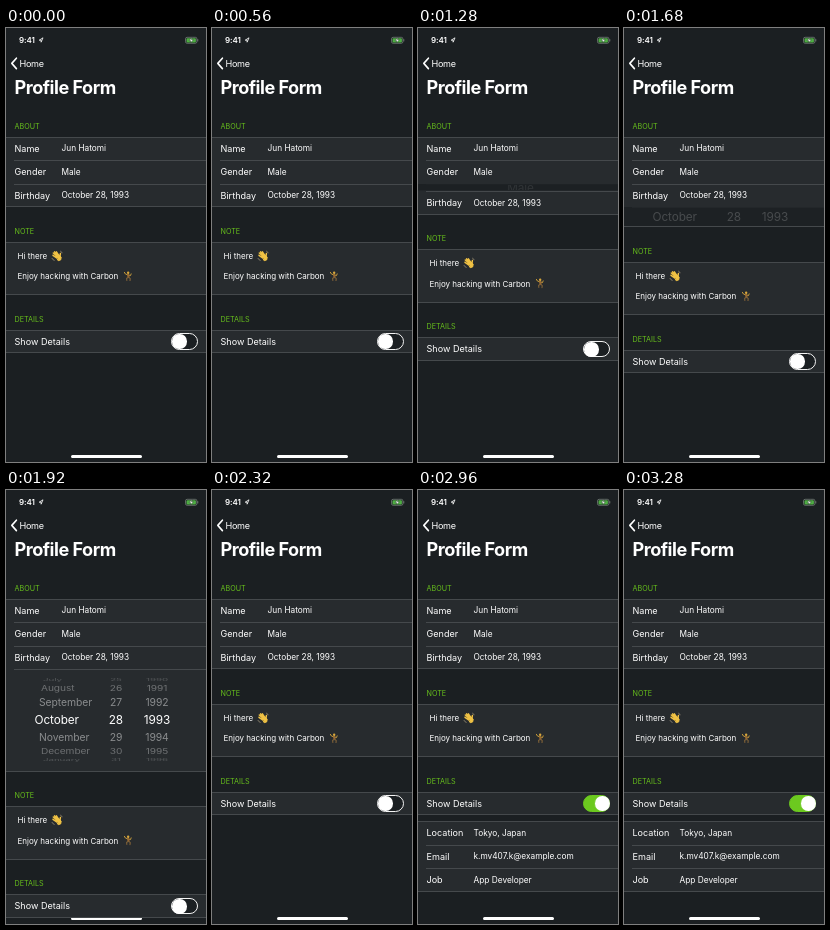
These frames come from a looping animation (200 px wide and 434 px high, 3360 ms). An HTML page:

```html
<!DOCTYPE html>
<html lang="en">
<head>
<meta charset="utf-8">
<title>Profile Form</title>
<style>
  :root { --bg: #1b1f22; --cell: #272b2e; --line: #45494c; --green: #6cc91f; --loop: 3360ms; }
  html, body { margin: 0; width: 100%; height: 100%; overflow: hidden; background: var(--bg); }
  body { position: relative; color: #fff; font: 9.07px/23.47px Inter, "Liberation Sans", sans-serif; white-space: nowrap; }
  .stage { position: absolute; inset: 0 auto auto 0; width: 200px; height: 434px; overflow: hidden; background: var(--bg); }
  .chrome { position: absolute; inset: 0; width: 200px; height: 434px; }
  .time, .back, h1 { position: absolute; margin: 0; }
  .time { left: 13px; top: 6px; font-size: 8px; line-height: 12px; font-weight: 600; letter-spacing: -.05px; }
  .back { left: 13.5px; top: 29px; line-height: 13px; letter-spacing: -.3px; }
  h1 { left: 8.5px; top: 47.4px; font-size: 18.1px; line-height: 24px; font-weight: 700; letter-spacing: -.5px; }

  .form { position: absolute; top: 74.1px; left: 0; width: 200px; }
  h2 { margin: 0; padding: 13.6px 0 0 8.5px; font-size: 7.2px; line-height: 21px; font-weight: 400; color: #66bd1c; }
  .group { position: relative; }
  .group::before, .group::after, .row + .row::before,
  .picker::before, .picker::after, .picker + .row::before {
    content: ""; position: absolute; z-index: 1; left: 0; right: 0; height: 1px; background: var(--line);
  }
  .group::before, .row::before, .picker::before { top: 0; }
  .group::after, .picker::after { bottom: 0; }
  .row + .row::before, .picker::before, .picker + .row::before { left: 8px !important; }
  .row { position: relative; height: 23.47px; padding-left: 8.5px; background: var(--cell); }
  .row span { position: absolute; left: 55.5px; top: .6px; font-size: 8.3px; }
  .note { position: relative; height: 53.4px; background: var(--cell); font-size: 8px; }
  .note p { position: absolute; left: 11.5px; margin: 0; line-height: 12px; }
  .note svg { position: absolute; width: 12px; height: 12px; }

  .picker { position: relative; height: 0; overflow: hidden; opacity: 0; background: var(--cell); }
  .picker::after { background: #6a6d70; }
  .wheel { position: absolute; left: 0; top: 50%; width: 200px; height: 56px; margin-top: -28px; overflow: hidden; font-size: 11.8px; line-height: 16px; letter-spacing: -.1px; }
  .date .wheel { height: 86px; margin-top: -43px; }
  .wheel i { position: absolute; top: 50%; margin-top: -8px; font-style: normal; }

  .gender { animation: gender var(--loop) infinite ease-in-out; }
  .date { animation: date var(--loop) infinite ease-in-out; }
  @keyframes gender {
    0%, 17.5% { height: 0; opacity: 0 }
    26%, 31.2% { height: 83.4px; opacity: 1 }
    40%, 100% { height: 0; opacity: 0 }
  }
  @keyframes date {
    0%, 47.3% { height: 0; opacity: 0 }
    56.2%, 59.7% { height: 102.5px; opacity: 1 }
    68.6%, 100% { height: 0; opacity: 0 }
  }

  .details { height: 0; overflow: hidden; opacity: 0; animation: details var(--loop) infinite ease-in-out; }
  .more { margin-top: 6px; }
  @keyframes details { 0%, 75% { height: 0; opacity: 0 } 84%, 100% { height: 76.5px; opacity: 1 } }

  .switch { position: absolute; left: 165px; top: 3.5px; width: 27.4px; height: 16.5px; box-sizing: border-box; border: 1px solid #f4f4f4; border-radius: 9px; animation: track var(--loop) infinite; }
  .switch b { position: absolute; left: 0; top: 0; width: 14.5px; height: 14.5px; border-radius: 50%; background: #fff; animation: knob var(--loop) infinite ease-in-out; }
  @keyframes track { 0%, 73% { background: var(--bg); border-color: #f4f4f4 } 78.5%, 100% { background: var(--green); border-color: var(--green) } }
  @keyframes knob { 0%, 73% { transform: none } 78.5%, 100% { transform: translateX(10.9px) } }
  .home { position: absolute; left: 64.6px; top: 427px; width: 71px; height: 2.6px; border-radius: 2px; background: #fff; }
</style>
</head>
<body>
<div class="stage">
  <svg class="chrome" viewBox="0 0 200 434" fill="none">
    <path d="M37 9.8 33.2 12.2H35.1V14.2Z" stroke="#fff" stroke-width=".8" stroke-linejoin="round"/>
    <rect x="179.5" y="9.3" width="11.4" height="6" rx="1.6" stroke="#7f8a82" stroke-width=".7"/>
    <rect x="180.5" y="10.2" width="9.4" height="4.2" rx=".9" fill="#4fae44"/>
    <path d="M185.8 9.6 183.1 12.8H185L184.4 15 187.4 11.7H185.5Z" fill="#fff" stroke="#1b1f22" stroke-width=".4"/>
    <path d="M191.8 11.2v2.2" stroke="#7f8a82" stroke-width=".8"/>
    <path d="M10.4 30.2 5.8 35.4 10.4 40.6" stroke="#fff" stroke-width="1.6" stroke-linecap="round" stroke-linejoin="round"/>
  </svg>
  <div class="time">9:41</div>
  <div class="back">Home</div>
  <h1>Profile Form</h1>

  <div class="form">
    <h2>ABOUT</h2>
    <div class="group">
      <div class="row">Name<span>Jun Hatomi</span></div>
      <div class="row">Gender<span>Male</span></div>
      <div class="picker gender"><div class="wheel"></div></div>
      <div class="row">Birthday<span>October 28, 1993</span></div>
      <div class="picker date"><div class="wheel"></div></div>
    </div>

    <h2>NOTE</h2>
    <div class="group note">
      <p style="top:8px">Hi there</p>
      <svg style="left:44.5px;top:8px" viewBox="0 0 12 12" fill="none" stroke="#f0c244" stroke-linecap="round">
        <path d="M5.8 6.3 2.3 3M6.6 5.4 3.6 1.9M7.6 5.1 5.4 1.8M5.3 7.6 2 5.3M8.9 6.6 9.4 3.6" stroke-width="1.5"/>
        <path d="M5 6 8 4.8 10.2 7.2 9.7 9.9 7.5 10.6Z" fill="#f0c244" stroke-width="1"/>
        <path d="M1 8.4q.6 1.6 2.2 2M9.6 1.2q1.2.4 1.5 1.6" stroke="#b9a98a" stroke-width=".6"/>
      </svg>
      <p style="top:28.5px">Enjoy hacking with Carbon</p>
      <svg style="left:116.5px;top:29px;width:10.5px;height:10.5px" viewBox="0 0 12 12" fill="none" stroke-linecap="round" stroke-linejoin="round">
        <path d="M5.2 4.4 2.7 3.4 1.6 1.5M6.7 4.6 8.6 5.2 9.3 3.3" stroke="#d9a83c" stroke-width="1"/>
        <path d="M5.7 4.4 6.4 7" stroke="#9a6a34" stroke-width="2.3"/>
        <path d="M5.9 7.2 4.1 8.6 4.4 10.8M6.7 7.2 8.3 8.8 8 11" stroke="#7d6038" stroke-width="1.3"/>
        <circle cx="5.9" cy="2" r="1.4" fill="#d9a83c"/>
      </svg>
    </div>

    <h2>DETAILS</h2>
    <div class="group">
      <div class="row">Show Details<div class="switch"><b></b></div></div>
    </div>
    <div class="details">
      <div class="group more">
        <div class="row">Location<span>Tokyo, Japan</span></div>
        <div class="row">Email<span>k.mv407.k@example.com</span></div>
        <div class="row">Job<span>App Developer</span></div>
      </div>
    </div>
  </div>
  <div class="home"></div>
</div>

<script>
  const fade = [1, .45, .33, .2];
  const shrink = [1, .88, .86, .83];
  const indent = [0, 4, 6, 8];

  // Lays items on a cylinder of the given radius and angle step.
  function addColumn(wheel, items, { x, start = 0, radius, step, left = false }) {
    items.forEach((text, n) => {
      const k = n + start, d = Math.abs(k), angle = k * step * Math.PI / 180;
      const item = document.createElement("i");
      item.textContent = text;
      item.style.left = (left ? x + indent[d] : x) + "px";
      item.style.opacity = fade[d];
      item.style.transformOrigin = left ? "0 50%" : "50% 50%";
      item.style.transform = (left ? "" : "translateX(-50%) ") +
        `translateY(${radius * Math.sin(angle)}px) scale(${shrink[d]}, ${Math.cos(angle)})`;
      wheel.append(item);
    });
  }

  const span = first => Array.from({ length: 7 }, (_, n) => first + n);
  const months = ["July", "August", "September", "October", "November", "December", "January"];
  const drum = { start: -3, radius: 41, step: 25 };
  const genderWheel = document.querySelector(".gender .wheel");
  const dateWheel = document.querySelector(".date .wheel");

  addColumn(genderWheel, ["Male", "Female", "Other"], { x: 102.5, radius: 33.5, step: 23 });
  addColumn(dateWheel, months, { ...drum, x: 28.5, left: true });
  addColumn(dateWheel, span(25), { ...drum, x: 109.8 });
  addColumn(dateWheel, span(1990), { ...drum, x: 151 });
</script>
</body>
</html>
```
